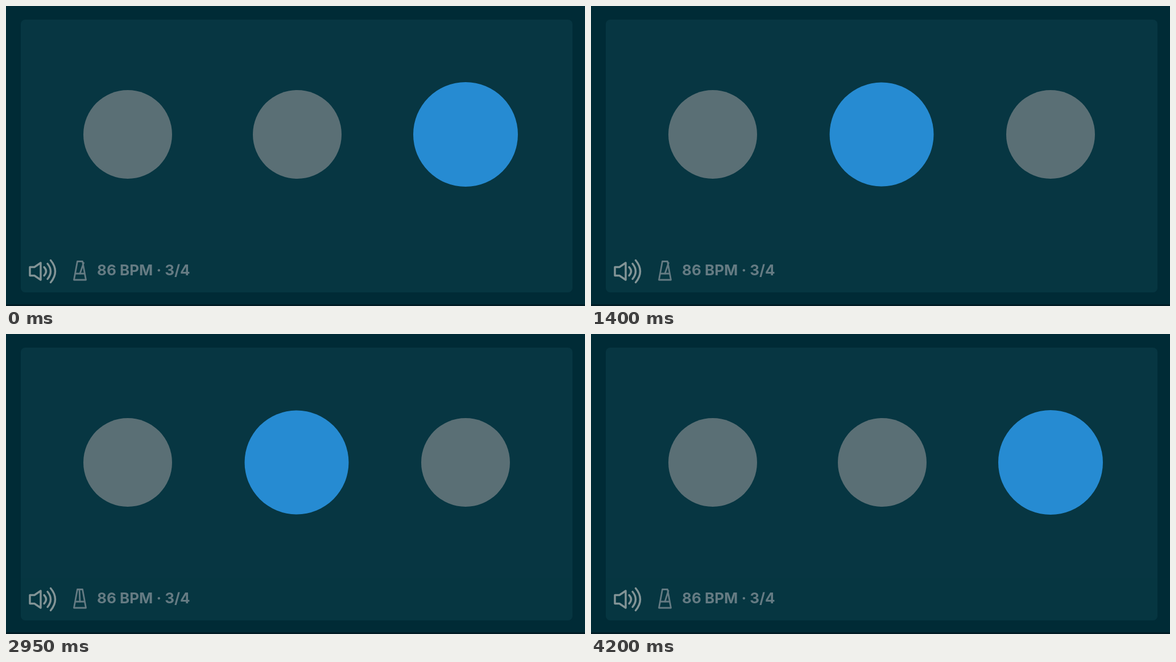
These frames come from a looping animation (1018 px wide and 528 px high, 4250 ms). An HTML page:

```html
<!DOCTYPE html>
<html lang="en">
<head>
<meta charset="utf-8">
<title>Metronome</title>
<style>
  html, body { margin: 0; width: 100%; height: 100%; overflow: hidden; background: #002b36; }
  svg { display: block; width: 100%; height: 100%; }
  text { font: 700 26px Inter, sans-serif; fill: #657b83; }
  .icon { fill: none; stroke-width: 3.4; stroke-linejoin: round; stroke-linecap: round; }
</style>
</head>
<body>
<svg viewBox="0 0 1018 528">
  <defs>
    <clipPath id="card"><rect x="26" y="24" width="970" height="480" rx="8"/></clipPath>
  </defs>
  <rect width="1018" height="528" fill="#002b36"/>
  <rect y="525" width="1018" height="3" fill="#001c25"/>
  <g clip-path="url(#card)">
    <rect x="26" y="24" width="970" height="480" fill="#073642"/>
    <rect id="flash" x="26" y="24" width="970" height="480" fill="#268bd2" opacity="0"/>
    <rect x="26" y="430" width="970" height="74" fill="#073642" opacity=".36"/>
  </g>
  <g id="accent">
    <circle cx="214" cy="226" r="116" fill="#268bd2"/>
    <circle cx="214" cy="226" r="108" fill="#073642"/>
  </g>
  <g id="dots"></g>
  <circle id="hole" cx="214" cy="226" r="46" fill="#073642"/>
  <g class="icon" stroke="#839496">
    <path d="M42 459.5H50L61 452V482L50 474.5H42Z"/>
    <path d="M67 459.5Q74 467 67 474.5M73 453.5Q84 467 73 480.5M78.5 447.5Q94.5 467 78.5 486.5"/>
  </g>
  <g class="icon" stroke="#657b83" style="stroke-width:2.8">
    <path d="M125.5 449.5H134.5L140.5 482H119.5ZM122 471H138"/>
    <path id="arm" d="M130 471V451"/>
  </g>
  <text x="160" y="474">86 BPM · 3/4</text>
</svg>
<script>
const LOOP = 4250, STEP = 50;
const BEAT = 60000 / 86;
const DOWNBEAT = 2235;   // start of the second bar
const FADE = 320;
const $ = id => document.getElementById(id);

const dots = [[214, 214], [512, 511], [808, 808]].map(([idleX, activeX]) => {
  const el = document.createElementNS('http://www.w3.org/2000/svg', 'circle');
  el.setAttribute('cy', 226);
  $('dots').append(el);
  return { el, idleX, activeX };
});

function draw(time) {
  const beats = (time - DOWNBEAT) / BEAT + 6;
  const index = Math.floor(beats) % 3;
  const sinceBeat = (beats % 1) * BEAT;

  dots.forEach(({ el, idleX, activeX }, i) => {
    const on = i === index;
    el.setAttribute('cx', on ? activeX : idleX);
    el.setAttribute('r', on ? (i === 1 ? 91.5 : 92) : 78);
    el.setAttribute('fill', on ? '#268bd2' : '#5a6f75');
  });

  const first = index === 0;
  for (const id of ['accent', 'hole'])
    $(id).setAttribute('visibility', first ? 'visible' : 'hidden');

  const left = first ? Math.max(0, 1 - sinceBeat / FADE) : 0;
  $('flash').setAttribute('opacity', 0.5 * left ** 1.5);

  const angle = 32 * Math.sin(Math.PI * beats);
  $('arm').setAttribute('transform', `rotate(${angle} 130 471)`);
}

function tick() {
  const time = performance.now() % LOOP;
  draw(Math.floor(time / STEP) * STEP);
  requestAnimationFrame(tick);
}
tick();
</script>
</body>
</html>
```
